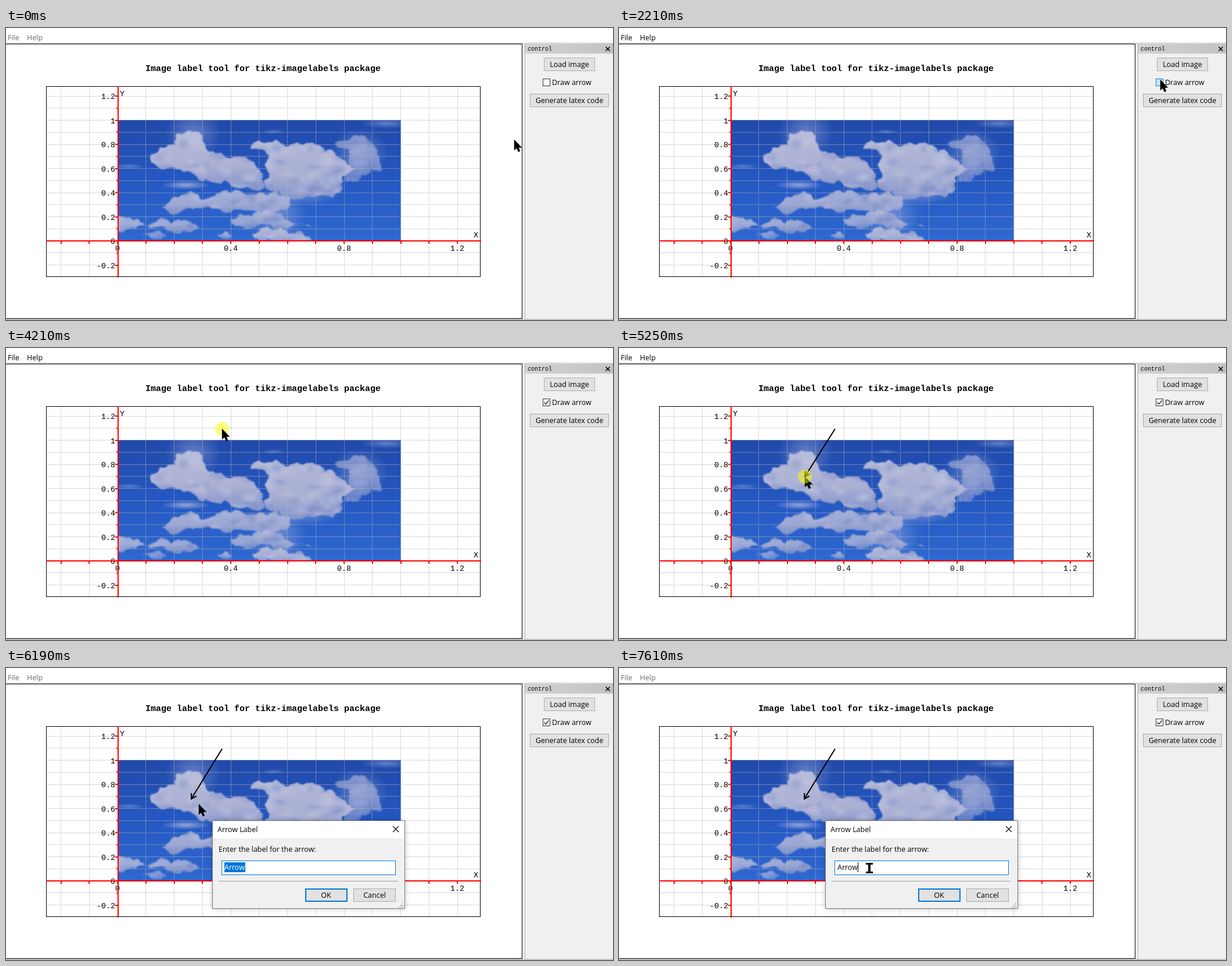
Write an HTML page with a canvas that moves like this. It is 1045x502 px and loops after 8 s.

```html
<!DOCTYPE html>
<html lang="en">
<head>
<meta charset="utf-8">
<title>Image label tool</title>
<style>
  html, body { margin: 0; width: 100%; height: 100%; overflow: hidden; background: #f0f0f0; }
  canvas { display: block; }
</style>
</head>
<body>
<canvas id="stage" width="1045" height="502"></canvas>
<script>
const W = 1045, H = 502, LOOP = 8000;
const UI = '12.5px "Open Sans", sans-serif';
const mono = size => `${size}px "Liberation Mono", monospace`;
const BLUE = '#0078d7', RED = '#ff0000';
const PHOTO = { x: 193, y: 158, w: 487, h: 208 };
const ARROW_START = [372, 139];
const CLICK = 2080, CHECK = 2280, PRESS = 4210, RELEASE = 5980, DESELECT = 7080, CARET = 7610;

const stage = document.getElementById('stage').getContext('2d');
let g = stage;

// ---- drawing helpers ----
function box(x, y, w, h, fill, border, line = 1) {
  g.fillStyle = fill;
  g.fillRect(x, y, w, h);
  if (!border) return;
  g.strokeStyle = border;
  g.lineWidth = line;
  g.strokeRect(x + line / 2, y + line / 2, w - line, h - line);
}

function text(str, x, y, { font = UI, color = '#000', align = 'left' } = {}) {
  g.font = font;
  g.fillStyle = color;
  g.textAlign = align;
  g.fillText(str, x, y);
}

function stroke(points, color, width) {
  g.strokeStyle = color;
  g.lineWidth = width;
  g.beginPath();
  points.forEach(([x, y]) => g.lineTo(x, y));
  g.stroke();
}

function cross(x, y, r, width) {
  stroke([[x - r, y - r], [x + r, y + r]], '#000', width);
  stroke([[x - r, y + r], [x + r, y - r]], '#000', width);
}

function button(label, x, y, w, hover) {
  box(x, y, w, 23, hover ? '#e5f1fb' : '#e1e1e1', hover ? BLUE : '#adadad');
  text(label, x + w / 2, y + 16, { align: 'center' });
}

// Runs draw() on a fresh transparent canvas and returns that canvas.
function layer(draw) {
  const canvas = document.createElement('canvas');
  canvas.width = W;
  canvas.height = H;
  const previous = g;
  g = canvas.getContext('2d');
  draw();
  g = previous;
  return canvas;
}

// ---- sky photo ----
let seed = 11;
function random() {
  seed = (seed * 16807) % 2147483647;
  return seed / 2147483647;
}

// Fractal midpoint displacement turns a coarse outline into a ragged edge.
function roughen(points, levels) {
  if (!levels) return points;
  const result = [];
  points.forEach(([x, y], i) => {
    const [nx, ny] = points[(i + 1) % points.length];
    const shift = (random() - 0.4) * 0.45;
    result.push([x, y], [(x + nx) / 2 + (ny - y) * shift, (y + ny) / 2 - (nx - x) * shift]);
  });
  return roughen(result, levels - 1);
}

function blob(x, y, rx, ry, rgb, alpha) {
  g.save();
  g.translate(x, y);
  g.scale(rx, ry);
  const fade = g.createRadialGradient(0, 0, 0, 0, 0, 1);
  fade.addColorStop(0, `rgba(${rgb},${alpha})`);
  fade.addColorStop(1, `rgba(${rgb},0)`);
  g.fillStyle = fade;
  g.fillRect(-1, -1, 2, 2);
  g.restore();
}

function cloud(alpha, ...coords) {
  const outline = [];
  for (let i = 0; i < coords.length; i += 2) outline.push([coords[i], coords[i + 1]]);
  const xs = outline.map(p => p[0]), ys = outline.map(p => p[1]);
  const left = Math.min(...xs), top = Math.min(...ys);
  const w = Math.max(...xs) - left, h = Math.max(...ys) - top;
  const shape = layer(() => {
    const shade = g.createLinearGradient(0, top, 0, top + h);
    shade.addColorStop(0, '#bcbfdc');
    shade.addColorStop(0.6, '#b0b4d6');
    shade.addColorStop(1, '#8897cc');
    g.fillStyle = shade;
    g.beginPath();
    roughen(outline, 3).forEach(([x, y]) => g.lineTo(x, y));
    g.fill();
    g.globalCompositeOperation = 'source-atop';
    for (let i = 0; i < w * h / 350; i++) {
      blob(left + random() * w, top + random() * h, 8 + random() * 14, 5 + random() * 8,
        random() < 0.5 ? '206,206,226' : '122,138,198', 0.45);
    }
  });
  g.globalAlpha = alpha;
  g.filter = 'blur(1.2px)';
  g.drawImage(shape, 0, 0);
  g.filter = 'none';
  g.globalAlpha = 1;
}

function drawPhoto() {
  const { x, y, w, h } = PHOTO;
  g.beginPath();
  g.rect(x, y, w, h);
  g.clip();
  const sky = g.createLinearGradient(0, y, 0, y + h);
  sky.addColorStop(0, '#2149a9');
  sky.addColorStop(0.5, '#2458c2');
  sky.addColorStop(1, '#2f68d0');
  box(x, y, w, h, sky);

  // thin haze
  blob(322, 180, 48, 50, '150,165,215', 0.55);
  blob(468, 322, 50, 50, '150,170,220', 0.6);
  blob(608, 215, 50, 42, '140,160,215', 0.6);
  blob(655, 164, 45, 9, '140,160,215', 0.6);
  blob(212, 238, 28, 5, '130,155,215', 0.6);
  blob(310, 270, 42, 8, '160,172,220', 0.9);
  blob(515, 287, 60, 18, '130,155,215', 0.6);
  blob(460, 178, 20, 4, '130,155,215', 0.5);

  cloud(0.97, 249, 219, 264, 206, 290, 202, 293, 182, 312, 177, 338, 190, 347, 211, 380, 223,
    405, 221, 428, 232, 438, 248, 446, 270, 405, 276, 345, 260, 300, 243, 254, 232);
  cloud(0.95, 420, 207, 436, 194, 462, 193, 482, 204, 512, 201, 550, 213, 572, 222, 604, 243,
    578, 256, 578, 279, 540, 288, 505, 294, 470, 280, 444, 266, 453, 250, 453, 219);
  cloud(0.6, 566, 199, 600, 184, 622, 192, 638, 208, 648, 244, 612, 252, 585, 264, 598, 240, 592, 208);
  cloud(0.85, 268, 308, 308, 286, 335, 295, 372, 280, 430, 286, 462, 280, 486, 290, 488, 307,
    430, 314, 380, 318, 340, 309, 295, 320);
  cloud(0.75, 386, 330, 405, 320, 440, 317, 478, 327, 526, 343, 480, 345, 430, 342);
  cloud(0.95, 424, 353, 442, 343, 472, 343, 486, 354, 526, 364, 470, 368, 432, 362);
  cloud(0.85, 190, 324, 215, 327, 238, 338, 262, 329, 286, 336, 310, 331, 333, 343, 305, 349, 270, 341, 215, 344, 190, 345);
  cloud(0.6, 234, 356, 256, 351, 276, 358, 254, 362);
  cloud(0.8, 364, 357, 376, 350, 388, 358, 374, 362);
}

// ---- plot ----
const gridX = k => 192 + 48.75 * k;
const gridY = k => 366 - 20.75 * k;

function drawGrid() {
  g.setLineDash([1, 1]);
  for (let k = -2; k <= 12; k++) {
    const x = Math.floor(gridX(k)) + 0.5, y = Math.floor(gridY(k)) + 0.5;
    stroke([[x, 101], [x, 427]], '#b4b4b4', 1);
    stroke([[70, y], [816, y]], '#b4b4b4', 1);
  }
  g.setLineDash([]);
}

function drawPlot() {
  box(69, 100, 748, 328, '#fff');
  g.drawImage(photo, 0, 0);
  drawGrid();
  box(69, 100, 748, 328, 'transparent', '#000');

  const label = { font: mono(13.33) };
  for (let k = -2; k <= 12; k++) {
    const x = Math.round(gridX(k)), y = Math.round(gridY(k)), even = k % 2 === 0;
    stroke([[x, 366], [x, 371]], RED, 2);
    stroke([[even ? 188 : 190, y], [193, y]], RED, 2);
    const value = String(k / 10);
    if (even) text(value, 188, y + 5, { ...label, align: 'right' });
    if (k >= 0 && k % 4 === 0) text(value, x, 383, { ...label, align: 'center' });
  }
  stroke([[69, 366], [818, 366]], RED, 2);
  stroke([[193, 100], [193, 429]], RED, 2);
  text('X', 805, 360, label);
  text('Y', 196, 117, label);
}

function drawWindow() {
  box(0, 0, W, H, '#f0f0f0');
  box(0, 0, W, 25, '#fff');
  box(0, 25, W, 2, '#d9d9d9');
  box(-2, 27, 891, 473, '#fff', '#000');
  box(0, 500, W, 2, '#c8c8c8');
  text('Image label tool for tikz-imagelabels package', 240, 74, { font: 'bold ' + mono(15) });
  drawPlot();

  box(893, 27, 1, 473, '#b5b5b5');
  const bar = g.createLinearGradient(894, 0, W, 0);
  bar.addColorStop(0, '#d2d2d2');
  bar.addColorStop(1, '#c3c3c3');
  box(894, 27, 151, 17, bar);
  text('control', 898, 39, { font: mono(10) });
  cross(1036, 36, 3.5, 1.6);
  button('Load image', 926, 51, 88);
  text('Draw arrow', 940, 98);
}

// ---- dialog ----
function drawDialog(selected) {
  g.shadowColor = 'rgba(0,0,0,.25)';
  g.shadowBlur = 8;
  box(355, 262, 332, 152, '#f0f0f0');
  g.shadowColor = 'transparent';
  box(356, 263, 330, 30, '#fff');
  box(355, 262, 332, 152, 'transparent', '#777');
  text('Arrow Label', 364, 282);
  cross(671, 277, 5, 1.1);
  text('Enter the label for the arrow:', 366, 316);
  box(371, 331, 300, 25, '#fff', BLUE);
  if (selected) box(376, 334, 36, 17, BLUE);
  text('Arrow', 376, 347, { color: selected ? '#fff' : '#000' });
  box(366, 366, 309, 1, '#a0a0a0');
  box(515, 379, 73, 23, '#e1e1e1', BLUE, 2);
  text('OK', 551, 395, { align: 'center' });
  button('Cancel', 598, 379, 73);
  for (let row = 0; row < 3; row++)
    for (let col = 2 - row; col < 3; col++) box(676 + col * 3, 404 + row * 3, 2, 2, '#bcbcbc');
}

const photo = layer(drawPhoto);
const windowLayer = layer(drawWindow);
const dialogSelected = layer(() => drawDialog(true));
const dialogPlain = layer(() => drawDialog(false));

// ---- pointer ----
const pointerPath = [
  [590, 875, 192], [1200, 935, 88], [1360, 935, 89], [1540, 935, 89], [1610, 934, 89],
  [1740, 934, 89], [1880, 932, 89], [2300, 932, 89], [2500, 860, 99], [2830, 624, 121],
  [3250, 358, 136], [3340, 353, 137], [3670, 370, 137], [3880, 372, 139], [4210, 372, 139],
  [4960, 330, 205], [5250, 320, 221], [5590, 319, 225], [6150, 319, 225], [6460, 414, 295],
  [6740, 433, 334], [7280, 431, 344]
];

function pointerAt(t) {
  const next = pointerPath.findIndex(key => key[0] > t);
  if (next === 0) return pointerPath[0].slice(1);
  if (next < 0) return pointerPath[pointerPath.length - 1].slice(1);
  const [t0, x0, y0] = pointerPath[next - 1], [t1, x1, y1] = pointerPath[next];
  const p = (t - t0) / (t1 - t0);
  return [Math.round(x0 + (x1 - x0) * p), Math.round(y0 + (y1 - y0) * p)];
}

const pointerShape = new Path2D('M0 0V18L4 14.5 7 21 10 19.5 7.5 13.5H13Z');

function drawPointer(x, y, t) {
  if (t > 6600 && y >= 331) {
    box(x - 6, y - 9, 12, 3, '#000');
    box(x - 2, y - 9, 4, 18, '#000');
    box(x - 6, y + 6, 12, 3, '#000');
    return;
  }
  const faded = t >= RELEASE && t < 6150;
  g.save();
  g.translate(x, y);
  g.fillStyle = faded ? '#6a6459' : '#000';
  g.fill(pointerShape);
  g.strokeStyle = '#000';
  g.lineWidth = faded ? 1 : 0.4;
  g.stroke(pointerShape);
  g.restore();
}

function drawHalo(x, y) {
  g.fillStyle = 'rgba(255,255,0,.5)';
  g.beginPath();
  g.arc(x, y, 12, 0, Math.PI * 2);
  g.fill();
}

function drawArrow([x0, y0], [x1, y1]) {
  const back = Math.atan2(y0 - y1, x0 - x1);
  const wing = turn => [x1 + 10 * Math.cos(back + turn), y1 + 10 * Math.sin(back + turn)];
  stroke([[x0, y0], [x1, y1]], '#000', 2);
  stroke([wing(-Math.PI / 6), [x1, y1], wing(Math.PI / 6)], '#000', 2);
}

function drawCheckbox(hover, checked) {
  box(924, 87, 13, 13, hover ? '#cce8ff' : '#fff', hover ? BLUE : '#333');
  if (checked) stroke([[926.5, 93.5], [929.5, 96.5], [934.5, 90]], hover ? BLUE : '#222', 1.3);
}

function draw(t) {
  const [x, y] = pointerAt(t);
  const inside = (left, top, right, bottom) => x >= left && x < right && y >= top && y < bottom;
  g.drawImage(windowLayer, 0, 0);

  const color = t >= CLICK && t < RELEASE ? '#000' : '#6d6d6d';
  text('File', 3, 21, { color });
  text('Help', 36, 21, { color });
  button('Generate latex code', 902, 113, 136, inside(902, 113, 1038, 136));
  drawCheckbox(inside(924, 85, 1010, 102), t >= CHECK);

  const dragging = t >= PRESS && t < RELEASE;
  if (t > PRESS + 70) drawArrow(ARROW_START, pointerAt(Math.min(t, RELEASE)));

  if (t >= RELEASE) {
    const p = Math.min((t - RELEASE) / 200, 1), scale = 0.95 + 0.05 * p;
    g.save();
    g.globalAlpha = Math.min(1, p * 1.2);
    g.translate(521, 338);
    g.scale(scale, scale);
    g.drawImage(t < DESELECT ? dialogSelected : dialogPlain, -521, -338);
    g.restore();
    if (t >= CARET) box(411, 334, 1, 17, '#000');
  }

  const haloBelow = t < PRESS + 70;
  if (dragging && haloBelow) drawHalo(x, y);
  drawPointer(x, y, t);
  if (dragging && !haloBelow) drawHalo(x, y);
}

const start = performance.now();
function tick() {
  draw((performance.now() - start) % LOOP);
  requestAnimationFrame(tick);
}
tick();
</script>
</body>
</html>
```
